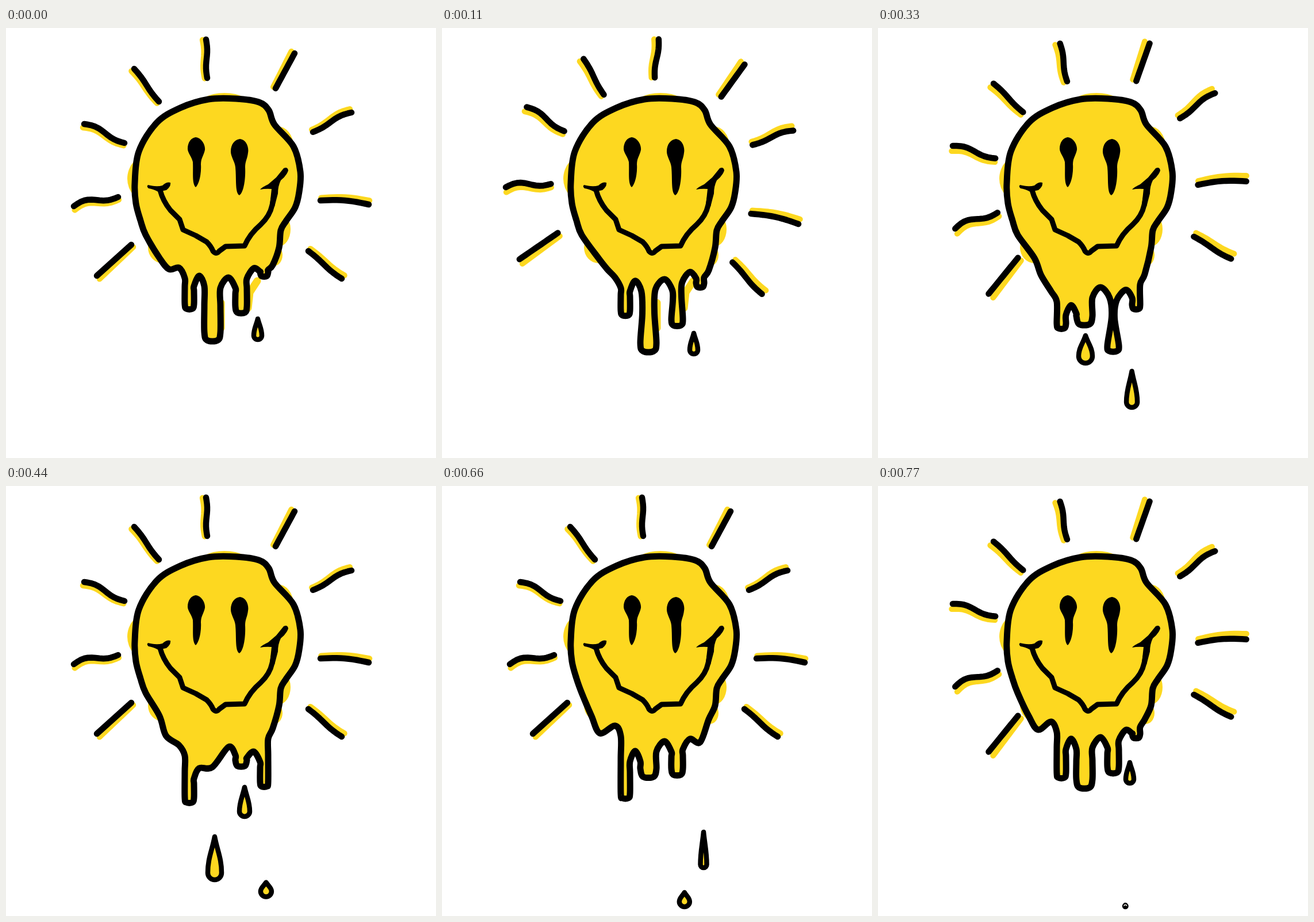
An HTML page that plays this animation: 748x748 px, repeating every 0.88 s.

```html
<!DOCTYPE html>
<html lang="en">
<head>
<meta charset="utf-8">
<title>Melting smiley sun</title>
<style>
  html, body { margin: 0; width: 100%; height: 100%; overflow: hidden; background: #fff; }
  svg { display: block; width: 100%; height: 100%; }
  path { stroke-linejoin: round; stroke-linecap: round; }
  .fill { fill: #fdd820; }
  .ink { fill: #000; }
  .face { fill: #fdd820; stroke: #000; stroke-width: 11; }
  .mouth { fill: none; stroke: #000; stroke-width: 9; }
  .drop { fill: #fdd820; stroke: #000; stroke-width: 8.5; }
  .ray { fill: none; stroke: #000; stroke-width: 10.5; }
  .glow { fill: none; stroke: #fdd820; stroke-width: 13; }
  .pose { visibility: hidden; }
</style>
</head>
<body>
<svg id="stage" viewBox="0 0 748 748"></svg>
<script>
const STEP = 110, STEPS = 8, FLOOR = 732;
const stage = document.getElementById('stage');

function add(parent, tag, attrs) {
  const el = document.createElementNS('http://www.w3.org/2000/svg', tag);
  for (const key in attrs) el.setAttribute(key, attrs[key]);
  return parent.appendChild(el);
}
const draw = (parent, cls, d) => add(parent, 'path', { class: cls, d });
const lerp = (a, b, k) => a + (b - a) * k;

// Swings around mid once per loop, largest at the step called peak
const sway = (t, mid, swing, peak) => mid + swing * Math.cos((t - peak) / STEPS * 2 * Math.PI);

// Straight moves between [step, value] keys
function track(keys, t) {
  const i = keys.findIndex(([step]) => step > t);
  const [t0, v0] = keys[i - 1], [t1, v1] = keys[i];
  return lerp(v0, v1, (t - t0) / (t1 - t0));
}

// Closed Catmull-Rom curve through the points
function smooth(pts) {
  const at = i => pts[(i + pts.length) % pts.length];
  let d = 'M' + pts[0];
  pts.forEach((p, i) => {
    const before = at(i - 1), next = at(i + 1), after = at(i + 2);
    const c1 = p.map((v, k) => v + (next[k] - before[k]) / 6);
    const c2 = next.map((v, k) => v - (after[k] - p[k]) / 6);
    d += `C${c1} ${c2} ${next}`;
  });
  return d + 'Z';
}

// Line between two ends, bent by an arch (bow) and an S-curve (wave)
function ray([x1, y1, x2, y2, bow = 0, wave = 0]) {
  const dx = x2 - x1, dy = y2 - y1, len = Math.hypot(dx, dy), parts = 12;
  return 'M' + Array.from({ length: parts + 1 }, (_, i) => {
    const s = i / parts;
    const off = (bow * Math.sin(Math.PI * s) + wave * Math.sin(2 * Math.PI * s)) / len;
    return [x1 + dx * s - dy * off, y1 + dy * s + dx * off];
  }).join('L');
}

const rays = [
  [348, 20, 350, 87, 0, -1.5],
  [502, 44, 469, 105],
  [601, 147, 534, 181, 2, 2],
  [547, 300, 631, 307, -3.5],
  [526, 388, 584, 436, 1, -1],
  [158, 431, 218, 377],
  [118, 310, 195, 294, -3, -4],
  [136, 167, 206, 200, -1.5, -3],
  [223, 71, 266, 128, 0, -1]
].map(ray).join('');

// The burst rocks to and fro; its shadow lags a little counterclockwise
const still = { turn: 'rotate(0)', lag: 1.5 };
const left = { turn: 'rotate(-8.9 377 225)', lag: 2.1 };
const right = { turn: 'rotate(7.5 366 240)', lag: 1.9 };
const rocking = [still, right, still, left];

const crown = [[224, 270], [231, 215], [262, 165], [303, 139], [352, 124], [400, 123], [440, 129],
  [457, 143], [467, 168], [500, 206], [512, 250], [510, 285]];
const rightCheek = [[503, 312], [487, 336], [478, 352], [475, 382]];
const leftCheek = [[243, 360], [234, 335], [226, 305]];

// Yellow bulges that show past the outline: cx, cy, rx, ry
const bulges = [[250, 262, 39, 42], [380, 140, 50, 27], [472, 205, 28, 34],
  [474, 350, 21, 30], [466, 395, 15, 19], [272, 382, 25, 27]];

// Drips from right to left: each grows, snaps and grows again
const drips = [
  { x: 449, w: 7, tip: [[0, 433], [3, 490], [4, 524], [5, 452], [8, 433]] },
  { x: 409, w: 10, sticky: true, tip: [[0, 497], [3, 564], [4, 489], [5, 508], [8, 497]] },
  { x: 359, w: 14, sticky: true, tip: [[0, 546], [2, 584], [3, 518], [4, 489], [5, 490], [8, 546]] },
  { x: 319, w: 8, tip: [[0, 490], [3, 524], [5, 580], [7, 509], [8, 490]] }
];
const pinch = [[0, 0], [3, 0.75], [4, 0], [8, 0]];

function dripPoints({ x, w, sticky, tip }, t, topRight, topLeft) {
  const end = track(tip, t), depth = end - Math.max(topRight, topLeft);
  if (depth < 8) return [[x, end]];
  const neck = sticky && depth > 60 ? w * (1 - track(pinch, t)) : w;
  const r = Math.min(w, depth / 2);
  const wall = (side, top) => [
    [x + side * (neck + w) / 2, top + Math.min(18, (end - top) * 0.4)],
    ...(depth > 50 ? [[x + side * neck, lerp(top, end, 0.45)]] : []),
    [x + side * w, end - r * 1.2],
    [x + side * w * 0.65, end - r * 0.2]
  ];
  return [...wall(1, topRight), ...wall(-1, topLeft).reverse()];
}

function facePoints(t) {
  const hip = [464, sway(t, 417, 12, 2.5)];
  const valleys = [
    [431, sway(t, 440, 22, 4)],
    [387, sway(t, 444, 10, 4)],
    [336, sway(t, 461, 30, 4)],
    [301, sway(t, 434, 24, 3)]
  ];
  const tops = [hip, ...valleys];
  const hem = drips.flatMap((drip, i) =>
    [tops[i], ...dripPoints(drip, t, tops[i][1], tops[i + 1][1])]);
  return [...crown, ...rightCheek, ...hem, valleys[3],
    [sway(t, 281, 7, 1.5), sway(t, 427, 8, 4.5)], [sway(t, 267, 7, 2), 400], ...leftCheek];
}

// Falling drops: free is the step of release, from and to the ages at which one shows
const drops = [
  { free: 2, from: -3, to: 2, x: 438, y: 592, len: 36, r: 9.5, fall: 68, drift: 3.6 },
  { free: 3, from: 0, to: 2, x: 361, y: 583, len: 48, r: 12, fall: 102, drift: 2 },
  { free: 4, from: 0, to: 3, x: 415, y: 575, len: 51, r: 9, fall: 102, drift: 1.7 },
  { free: 5, from: 0, to: 1, x: 455, y: 574, len: 35, r: 5.5, fall: 90, drift: 0 }
];

// Hangs, stretches as it falls, then flattens on the floor
function dropPath(drop, t) {
  const age = (t - drop.free + 3 + STEPS) % STEPS - 3;
  if (age < drop.from || age > drop.to) return '';
  const fallen = Math.max(age, 0), x = drop.x + drop.drift * fallen ** 2;
  const base = Math.min(drop.y + drop.fall * fallen ** 0.85 + 25 * Math.min(age, 0), FLOOR);
  const len = age < 2 ? drop.len + 27 * fallen : 25 - 22 * (age - 2);
  const r = Math.min(drop.r, len * 0.42 , age < 0 ? 7 : drop.r);
  const tip = base - len, belly = base - r, h = (belly - tip) * 0.4;
  return `M${x} ${tip}C${x + r * 0.4} ${tip + h} ${x + r} ${belly - h} ${x + r} ${belly}` +
    `A${r} ${r} 0 0 1 ${x - r} ${belly}C${x - r} ${belly - h} ${x - r * 0.4} ${tip + h} ${x} ${tip}Z`;
}

function drawPose(t) {
  const group = add(stage, 'g', { class: 'pose' });
  const { turn, lag } = rocking[t % rocking.length];
  const burst = add(group, 'g', { transform: turn });
  add(burst, 'path', { class: 'glow', d: rays, transform: `rotate(${-lag} 372 255)`, style: 'stroke-width:10' });
  draw(burst, 'ray', rays);

  for (const [cx, cy, rx, ry] of bulges) add(group, 'ellipse', { class: 'fill', cx, cy, rx, ry });
  if (t < 3) draw(group, 'glow', 'M374 478V522M437 440L424 460L421 487');
  draw(group, 'face', smooth(facePoints(t)));
  for (const drop of drops) draw(group, 'drop', dropPath(drop, t));
  return group;
}

for (let t = 0; t < STEPS; t++) {
  const on = 1 / STEPS;
  drawPose(t).animate([
    { visibility: 'visible', offset: 0 },
    { visibility: 'visible', offset: on },
    { visibility: 'hidden', offset: on },
    { visibility: 'hidden', offset: 1 }
  ], { duration: STEP * STEPS, delay: (t - STEPS) * STEP, iterations: Infinity });
}

// Eyes and mouth stay still above every pose
draw(stage, 'ink', 'M330 190C340 191 347 203 346 212C344 222 339 226 339 237C340 251 337 270 330 277' +
  'C323 271 326 250 325 233C323 224 316 217 316 210C316 199 322 191 330 190Z');
draw(stage, 'ink', 'M407 193C417 194 423 206 421 217C420 227 416 232 416 242C417 260 414 286 406 291' +
  'C398 287 401 262 399 242C398 232 391 224 391 215C391 202 398 194 407 193Z');
draw(stage, 'mouth', 'M268 282Q273 301 286 317L302 333L308 351L330 361L349 372Q357 380 360 388Q366 395 371 388' +
  'L382 380L415 379Q424 358 443 342Q459 327 463 308L468 280');
draw(stage, 'ink', 'M247 273Q262 277 272 274Q280 267 286 269Q287 276 279 282L265 285Q256 280 248 279Q244 276 247 273Z');
draw(stage, 'ink', 'M442 281Q445 277 456 272Q463 266 470 260L483 244Q490 241 491 248Q488 257 478 265' +
  'Q473 275 473 288L467 311L459 308L462 280Q452 279 442 281Z');
</script>
</body>
</html>
```
